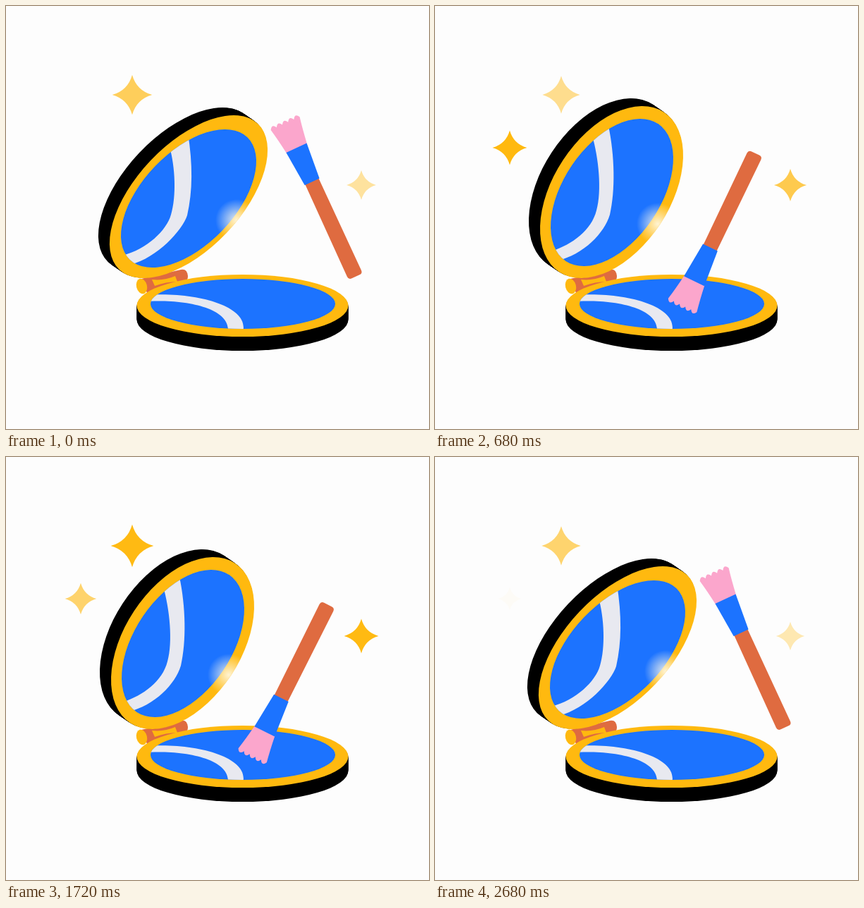
Animation, 600 px wide and 600 px high, one loop 2720 ms. Source, as an HTML page with a canvas:

```html
<!DOCTYPE html>
<html lang="en">
<head>
<meta charset="utf-8">
<title>Compact and brush</title>
<style>
html, body { margin: 0; width: 100%; height: 100%; overflow: hidden; background: #fdfdfd; }
canvas { display: block; width: 600px; height: 600px; }
</style>
</head>
<body>
<canvas id="stage" width="600" height="600"></canvas>
<script>
const ctx = document.getElementById('stage').getContext('2d');
const LOOP = 2720, STEP = 40, TWINKLE = LOOP / 2;
const BLUE = '#1c73ff', GOLD = '#ffb90f', RUST = '#df6b40', PINK = '#fba6cc', PALE = '#e8e9f0';

const mix = (a, b, k) => a + (b - a) * k;
const mixAll = (a, b, k) => a.map((v, i) => mix(v, b[i], k));
const cubic = u => u < 0.5 ? 4 * u ** 3 : 1 - 4 * (1 - u) ** 3;
const ramp = (t, start, length) => Math.min(1, Math.max(0, (t - start) / length));
const ease = (t, start, length) => cubic(ramp(t, start, length));
const rad = deg => deg * Math.PI / 180;

// Ellipses: centre x, y, radius x, y, angle in degrees
const LID = {
  shut: { rim: [259, 270.5, 142.7, 74.4, -46.5], glass: [259, 273, 120.3, 66, -46.1],
    band: [232, 200, 240, 228, 242, 270, 234, 296, 228, 318, 200, 345, 165, 354,
      176, 367, 215, 357, 250, 318, 257, 297, 265, 262, 265, 225, 258, 180] },
  open: { rim: [250.5, 264, 135.5, 82.6, -56.7], glass: [251, 264.5, 117.3, 68.7, -55.9],
    band: [223, 184, 232, 215, 237, 262, 229, 290, 222, 318, 195, 338, 165, 348,
      172, 362, 212, 352, 240, 322, 248, 296, 256, 262, 255, 212, 246, 170] }
};
const STARS = [
  { x: 179, y: 126, size: 30.5, peak: 290 },
  { x: 106, y: 201, size: 24.5, peak: 685 },
  { x: 504, y: 254, size: 24.5, peak: 420 }
];

function fill(color, path) {
  ctx.fillStyle = color;
  ctx.fill(path instanceof Path2D ? path : new Path2D(path));
}

function oval([x, y, rx, ry, deg = 0]) {
  const p = new Path2D();
  p.ellipse(x, y, rx, ry, rad(deg), 0, Math.PI * 2);
  return p;
}

// Solid side of a disc, swept along an offset
function extrude(disc, dx, dy) {
  const [x, y, ...rest] = disc;
  for (let i = 1; i <= 20; i++) fill('#000', oval([x + dx * i / 20, y + dy * i / 20, ...rest]));
}

function inside(path, draw) {
  ctx.save();
  ctx.clip(path);
  draw();
  ctx.restore();
}

function drawHinge() {
  fill(RUST, 'M192 387L248 374Q257 372 258 383Q258 389 254 391L200 407Z');
  fill(GOLD, 'M207 388Q224 390 240 383L243 391Q227 391 211 397Z');
  fill(GOLD, oval([192.5, 397.5, 7.5, 11, -14]));
}

function drawLid(t) {
  const k = ease(t, 0, 560) - ease(t, 2110, 610);
  const pose = key => mixAll(LID.shut[key], LID.open[key], k);
  const rim = pose('rim'), glass = oval(pose('glass')), b = pose('band');
  extrude(rim, -16, -11);
  fill(GOLD, oval(rim));
  fill(BLUE, glass);
  inside(glass, () => {
    fill(PALE, `M${b.slice(0, 2)}C${b.slice(2, 14)}L${b.slice(14, 16)}C${b.slice(16)}Z`);
    const sweep = ramp(t, 790, 440);
    if (sweep > 0 && sweep < 1) {
      ctx.translate(251, 264.5);
      ctx.rotate(rad(-27.5));
      ctx.fillStyle = '#f8f9fd';
      ctx.fillRect(mix(-125, 125, sweep) - 13.5, -150, 27, 300);
    }
  });
  const gx = mix(327, 316, k), gy = mix(304, 309, k), r = 30;
  const glow = ctx.createRadialGradient(gx, gy, 0, gx, gy, r);
  glow.addColorStop(0, 'rgba(255,250,232,.9)');
  glow.addColorStop(0.45, 'rgba(255,250,232,.5)');
  glow.addColorStop(1, 'rgba(255,250,232,0)');
  inside(oval(rim), () => {
    ctx.fillStyle = glow;
    ctx.fillRect(gx - r, gy - r, r * 2, r * 2);
  });
}

function drawBase() {
  const rim = [335.5, 425, 150, 44], glass = oval([336, 422.5, 131, 35.5]);
  extrude(rim, 0, 20);
  fill(GOLD, oval(rim));
  fill(BLUE, glass);
  inside(glass, () =>
    fill(PALE, 'M200 419C255 416 318 428 315 462L336 462C346 426 270 405 200 410Z'));
}

function drawBrush(t) {
  const k = ease(t, 68, 640) - ease(t, 1640, 650);
  ctx.save();
  ctx.translate(mix(445, 401.7, k), mix(273, 319, k));
  ctx.rotate(rad(mix(65.3, -64.4, k)));
  fill(RUST, 'M-27 -10.5L117 -11Q122 -11 122 -6V6Q122 11 117 11L-27 10.5Z');
  let tuft = 'M-78 -16Q-100 -19 -117 -22.5';
  for (let i = 0; i < 5; i++) {
    const y = -22.5 + i * 9;
    tuft += `Q-125 ${y + 4.5} -117 ${y + 9}`;
  }
  fill(PINK, tuft + 'Q-100 19 -78 16Z');
  fill(BLUE, 'M-79 -16L-26 -11.5V11.5L-79 16Z');
  ctx.restore();
}

function drawStar(t, { x, y, size, peak }) {
  const wave = (1 + Math.cos((t - peak) / TWINKLE * Math.PI * 2)) / 2;
  const alpha = wave ** 0.8, r = size * (0.6 + 0.4 * Math.sqrt(alpha)), c = r * 0.22;
  ctx.save();
  ctx.globalAlpha = alpha;
  ctx.translate(x, y);
  fill(GOLD, `M0 ${-r}Q${c} ${-c} ${r} 0Q${c} ${c} 0 ${r}Q${-c} ${c} ${-r} 0Q${-c} ${-c} 0 ${-r}Z`);
  ctx.restore();
}

function draw(t) {
  ctx.fillStyle = '#fdfdfd';
  ctx.fillRect(0, 0, 600, 600);
  drawHinge();
  drawLid(t);
  drawBase();
  drawBrush(t);
  STARS.forEach(star => drawStar(t, star));
}

const begin = performance.now();
function tick() {
  const t = (performance.now() - begin) % LOOP;
  draw(Math.floor(t / STEP) * STEP);
  requestAnimationFrame(tick);
}
tick();
</script>
</body>
</html>
```
